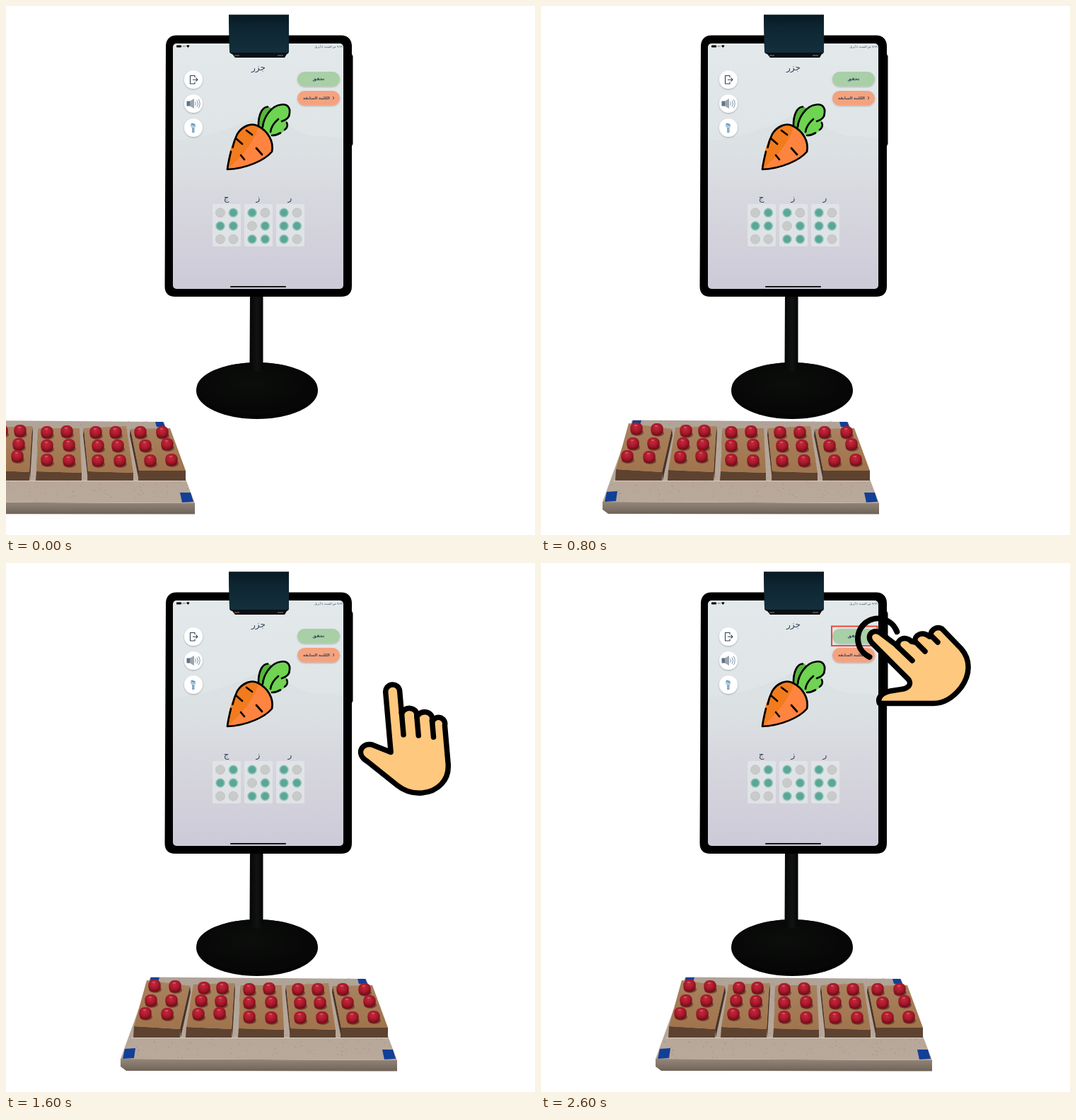
Write an HTML page that moves like this. It is 748 px wide and 748 px high and loops after 3000 ms.

```html
<!DOCTYPE html>
<html lang="ar">
<head>
<meta charset="utf-8">
<title>Braille board</title>
<style>
  html, body { margin: 0; width: 100%; height: 100%; overflow: hidden; background: #fff; }
  svg { display: block; width: 100vw; height: 100vh; }
  text { font-family: "DejaVu Sans", sans-serif; text-anchor: middle; fill: #30435a; }
  .ink { fill: none; stroke: #000; stroke-linecap: round; stroke-linejoin: round; }
  .skin { fill: #ffc87f; stroke: #000; stroke-linejoin: round; }
</style>
</head>
<body>
<svg viewBox="0 0 748 748" xmlns="http://www.w3.org/2000/svg">
  <defs>
    <linearGradient id="screen" x2="0" y2="1">
      <stop offset="0" stop-color="#e3e9eb"/>
      <stop offset=".4" stop-color="#dfe4e6"/>
      <stop offset=".6" stop-color="#d8d9df"/>
      <stop offset="1" stop-color="#cdcad8"/>
    </linearGradient>
    <linearGradient id="ridge" x2="0" y2="1">
      <stop offset="0" stop-color="#d3dbde" stop-opacity=".45"/>
      <stop offset="1" stop-color="#d3dbde" stop-opacity="0"/>
    </linearGradient>
    <linearGradient id="clamp" x2="0" y2="1">
      <stop offset="0" stop-color="#081922"/>
      <stop offset=".35" stop-color="#0d2632"/>
      <stop offset="1" stop-color="#142f3d"/>
    </linearGradient>
    <linearGradient id="pole">
      <stop offset="0" stop-color="#050606"/>
      <stop offset=".55" stop-color="#111312"/>
      <stop offset="1" stop-color="#050505"/>
    </linearGradient>
    <radialGradient id="foot" cx=".45" cy=".4">
      <stop offset="0" stop-color="#0c0e0c"/>
      <stop offset="1" stop-color="#060706"/>
    </radialGradient>
    <linearGradient id="wood" x2="0" y2="1">
      <stop offset="0" stop-color="#a98260"/>
      <stop offset="1" stop-color="#a0744c"/>
    </linearGradient>
    <linearGradient id="card" x2="0" y2="1">
      <stop offset="0" stop-color="#b0a397"/>
      <stop offset="1" stop-color="#b9a99b"/>
    </linearGradient>
    <linearGradient id="edge" x2="0" y2="1">
      <stop offset="0" stop-color="#95877a"/>
      <stop offset="1" stop-color="#6f6257"/>
    </linearGradient>
    <radialGradient id="peg" cx=".45" cy=".35" r=".65">
      <stop offset="0" stop-color="#c32a3d"/>
      <stop offset=".55" stop-color="#a9192b"/>
      <stop offset="1" stop-color="#6d0c18"/>
    </radialGradient>
    <filter id="drop" x="-30%" y="-30%" width="160%" height="170%">
      <feDropShadow dx="0" dy="1" stdDeviation="1" flood-opacity=".28"/>
    </filter>
  </defs>

  <!-- stand -->
  <ellipse cx="355" cy="544" rx="86" ry="40" fill="#030404"/>
  <ellipse cx="355" cy="541" rx="85.5" ry="37" fill="url(#foot)"/>
  <path d="M345 405H363.500V508Q367 516 355 517Q341 516 344.500 508Z" fill="url(#pole)"/>

  <!-- tablet -->
  <path d="M241 41.5H474Q488 42 489 56V68L490.500 71V195L489 198V396Q489 411 474 411H239Q224.500 411 224.500 396L226 56Q227 42 241 41.500Z"/>
  <rect x="236" y="53" width="241" height="347" rx="5" fill="url(#screen)"/>
  <path d="M236 190Q270 188 300 178T350 158T395 166T440 184T477 188V250H236Z" fill="url(#ridge)"/>
  <path d="M315 12.5H400V64Q400 67 397 68L394 73H324L320 68Q316 67 316 64Z" fill="#0a1014"/>
  <path d="M315 12.5H400V63Q400 66 397 66H319Q316 66 316 63Z" fill="url(#clamp)"/>
  <path d="M323 70H330M384 70H392" stroke="#6d5548" stroke-width="1.6"/>
  <rect x="241" y="55.5" width="7" height="3" rx=".8"/>
  <path d="M249.5 57H254" stroke="#777" stroke-width="1.6" stroke-dasharray="1 .6"/>
  <path d="M255 56.3Q257.3 54.2 259.6 56.3L257.3 59Z"/>
  <text x="456" y="59" font-size="4" direction="rtl">٩:٢٩ ص السبت ٤ أبريل</text>
  <rect x="317" y="396" width="79" height="1.8" rx=".9"/>

  <text x="357" y="91" font-size="12">جزر</text>
  <g filter="url(#drop)">
    <rect x="412" y="93" width="60" height="20.5" rx="10.25" fill="#a9cfa6"/>
    <rect x="412" y="120" width="60" height="20.5" rx="10.25" fill="#f5a27e"/>
    <g fill="#fff">
      <circle cx="265" cy="104" r="13"/>
      <circle cx="265" cy="138" r="13"/>
      <circle cx="265" cy="172" r="13"/>
    </g>
  </g>
  <text x="442" y="105.3" font-size="6.2" font-weight="bold">تحقق</text>
  <text x="439" y="132.2" font-size="5.3" font-weight="bold">الكلمة السابقة</text>
  <path d="M462 128L464 130L462 132" fill="none" stroke="#30435a"/>

  <!-- round button icons -->
  <g fill="none" stroke="#30435a" stroke-width="1.1" stroke-linejoin="round">
    <path d="M267 101V98.500H260.500V110H267V107.500M264 104.200H271M268.500 101.700L271 104.200L268.500 106.700"/>
    <path d="M267.500 135.500Q269.500 138 267.500 140.500M270 133.500Q273 138 270 142.500M272.300 132Q276 138 272.300 144" stroke="#71879b" stroke-width=".9"/>
  </g>
  <path d="M255.500 134.500H260V141.500H255.500Z" fill="#5d7388"/>
  <path d="M260 134.500L266 131V145L260 141.500Z" fill="#9aa5af"/>
  <path d="M261 167Q264 163.500 267.500 167Q269.500 170 266.500 172.500V179Q264.500 181 263 179V172.500Q260 170 261 167Z" fill="#a9c9df"/>
  <path d="M262 166.500L267 168.500M263 174H266.500M263 177H266.500" stroke="#4e7290" stroke-width="1.1"/>

  <!-- carrot -->
  <g stroke-linecap="round" stroke-linejoin="round">
    <path d="M357 170C357 156 361 143 370 142C374 143 376 145 377 147L372 177Z" fill="#57b53d"/>
    <path d="M362 172C364 159 374 141 389 139.500C398 138 402 144 401 151C401 157 398 160 396 162C400 166 398 174 392 178C386 182 380 183 375 183Z" fill="#6ed452"/>
    <path d="M313 231C314 214 318 195 327 181C334 170 347 164 357 170C370 177 379 191 376 206C366 218 340 230 313 231Z" fill="#ff8440"/>
    <path d="M313 231C314 214 318 195 327 181C334 170 347 164 357 170C353 187 340 207 313 231Z" fill="#f27b1d"/>
    <path class="ink" stroke-width="2.7" d="M318 206C316 214 314 223 313 231C340 230 366 218 376 206C379 191 370 177 357 170C347 164 334 170 327 181C324 187 322 193 320.500 200
      M357 168C357 156 361 143 370 142.500M363 171C364 159 374 141 389 139.500C398 138 402 144 401 151C401 157 397 161 390 163M374 178C375 171 379 165 385 160M397 165C399 169 397 173 394 175M388 179.500C384 182 380 183 376 183
      M326 188L334 195M340 176L348 182M332 211L337 217M354 201L362 210"/>
  </g>

  <g id="cells"></g>

  <!-- sliding board, drawn at its resting place -->
  <g id="board">
    <path d="M162 701L553 703V718.5L170 718L162 712Z" fill="url(#edge)"/>
    <path d="M204 585.5L509 588L553 703L162 701Z" fill="url(#card)"/>
    <path id="specks" stroke="#79695d" stroke-opacity=".55" fill="none"/>
    <path d="M177 671.500H540" stroke="#d0c4b8" stroke-width="1.5"/>
    <g fill="#123f97">
      <path d="M205 586H217L215 592H203Z"/>
      <path d="M497 588H508L511 595H499Z"/>
      <path d="M168 687L183 686L181 700L165 701Z"/>
      <path d="M532 688H547L551 701L535 702Z"/>
    </g>
    <g id="blocks"></g>
  </g>

  <g id="hand">
    <path class="skin" stroke-width="7.5" d="M548 295V210A10 10 0 0 1 568 210V243A10.500 9 0 0 1 589 246V249A10.500 9 0 0 1 610 255V258A9 9 0 0 1 627.300 264V318C627.300 342 609 356.300 587 356.300C572 356.300 562 351 553 342.500L513 304.500C498 293 508 278 522 282Z"/>
    <path class="ink" stroke-width="7.5" d="M568 240V272M589 248V275M610 256V279"/>
  </g>

  <g id="press">
    <rect x="411" y="89.5" width="64.5" height="27.5" fill="none" stroke="#ee3a28" stroke-width="1.8"/>
    <path class="ink" stroke-width="8" d="M503.300 97.200A28.500 28.500 0 1 0 464.500 132.800"/>
    <path class="skin" stroke-width="7.5" d="M520 165L467.500 112.500C459 102 470 92 480 99L505 118C502 108 515 102 524 111L529 112C527 101 540 96 549 104L551 104C550 94 560 89 567 93L594 121C608 137 607 158 594 176C583 190 571 198.500 555 198.500H478.500C475 189 484 183 494 181L513 178Q525 174 520 165Z"/>
    <path class="ink" stroke-width="7.5" d="M503 117L525 138M528 110L543 125M551 102L561 112"/>
  </g>
</svg>
<script>
const $ = id => document.getElementById(id);

function add(parent, tag, attrs, text) {
  const el = document.createElementNS('http://www.w3.org/2000/svg', tag);
  for (const k in attrs) el.setAttribute(k, attrs[k]);
  if (text) el.textContent = text;
  return parent.appendChild(el);
}

// Braille cells: six bits, row by row.
[['ج', '011100'], ['ز', '100111'], ['ر', '101110']].forEach(([letter, bits], i) => {
  const g = $('cells'), x = 292 + 45 * i;
  add(g, 'text', { x: x + 19.5, y: 275, 'font-size': 12 }, letter);
  add(g, 'rect', { x, y: 280, width: 40, height: 60, rx: 2.5, fill: '#e4e8ea', 'fill-opacity': .75 });
  [...bits].forEach((bit, n) => {
    const at = { cx: x + 11 + 18.4 * (n % 2), cy: 292.3 + 18.7 * (n >> 1) };
    const on = bit === '1';
    add(g, 'circle', { ...at, r: 6.5, fill: on ? '#83bfb3' : '#c9caca', stroke: on ? '#a5d0c7' : '#bbbcbd', 'stroke-width': .7 });
    if (on) add(g, 'circle', { ...at, r: 5, fill: '#5ba697' });
  });
});

// Each block: top face TL, TR, BR, BL, then its pegs.
const blocks = [
  { face: [199, 590, 260, 598, 246, 659, 181, 655], pegs: [210, 597, 239, 598, 205, 618, 234, 618, 197, 636, 228, 637] },
  { face: [265, 596, 323, 594, 319, 659, 255, 656], pegs: [280, 600, 306, 600, 276, 618, 304, 619, 272, 637, 302, 636] },
  { face: [332, 597, 390, 597, 393, 660, 329, 658], pegs: [344, 602, 372, 601, 344, 621, 375, 620, 344, 641, 375, 642] },
  { face: [396, 597, 456, 594, 466, 660, 402, 658], pegs: [413, 602, 441, 602, 416, 621, 444, 621, 416, 642, 447, 642] },
  { face: [462, 598, 518, 597, 540, 657, 474, 657], pegs: [476, 602, 507, 602, 483, 621, 514, 619, 490, 642, 520, 641] }
];
const FLOOR = 671;
const poly = (parent, points, fill) => add(parent, 'polygon', { points: points.join(' '), fill });

blocks.forEach(({ face, pegs }, i) => {
  const g = $('blocks');
  const [ax, ay, bx, by, cx, cy, dx, dy] = face;
  if (i < 2) poly(g, [bx, by, bx + 1, by + 9, cx + 1, FLOOR, cx, cy], '#4a3427');
  if (i > 1) poly(g, [ax, ay, ax - 1, ay + 9, dx, FLOOR, dx, dy], '#4a3427');
  poly(g, [dx, dy, cx, cy, cx, FLOOR, dx - 1, FLOOR], '#5e4230');
  poly(g, face, 'url(#wood)');
  for (let n = 0; n < pegs.length; n += 2) {
    const x = pegs[n], y = pegs[n + 1];
    add(g, 'ellipse', { cx: x + 1, cy: y + 6, rx: 9, ry: 5, fill: '#4b2218', 'fill-opacity': .55 });
    add(g, 'rect', { x: x - 8.7, y: y - 8, width: 17.4, height: 17.4, rx: 7.5, fill: 'url(#peg)' });
    add(g, 'ellipse', { cx: x - 1, cy: y - 4, rx: 2.4, ry: 1.1, fill: '#ef8b96', 'fill-opacity': .5 });
  }
});

// Cardboard grain.
let seed = 7;
const rand = () => (seed = seed * 16807 % 2147483647) / 2147483647;
let grain = '';
for (let i = 0; i < 260; i++) {
  const v = rand(), left = 204 - 42 * v, right = 509 + 44 * v;
  grain += `M${(left + rand() * (right - left)).toFixed(1)} ${(587 + 113 * v).toFixed(1)}h1`;
}
$('specks').setAttribute('d', grain);

const STEP = 200, LOOP = 3000, PRESS = 13;
const slide = [-286, -243, -200, -138, -75, 0];
// Palm x, palm y, tilt; first entry belongs to step 6.
const poses = [
  [593, 335, 0], [587, 310, 0], [584.3, 279, -5], [581.7, 247, -10],
  [579, 216, -15], [578.5, 192.5, -20], [577, 186, -27]
];

function draw(now) {
  const step = Math.min(PRESS, Math.floor(now % LOOP / STEP));
  const pose = poses[step - 6];
  $('board').setAttribute('transform', `translate(${slide[Math.min(step, 5)]})`);
  $('hand').style.display = pose ? '' : 'none';
  if (pose) $('hand').setAttribute('transform', `translate(${pose[0]} ${pose[1]}) rotate(${pose[2]}) translate(-587 -310)`);
  $('press').style.display = step === PRESS ? '' : 'none';
}

const start = performance.now();
function tick() {
  draw(performance.now() - start);
  requestAnimationFrame(tick);
}
tick();
</script>
</body>
</html>
```
